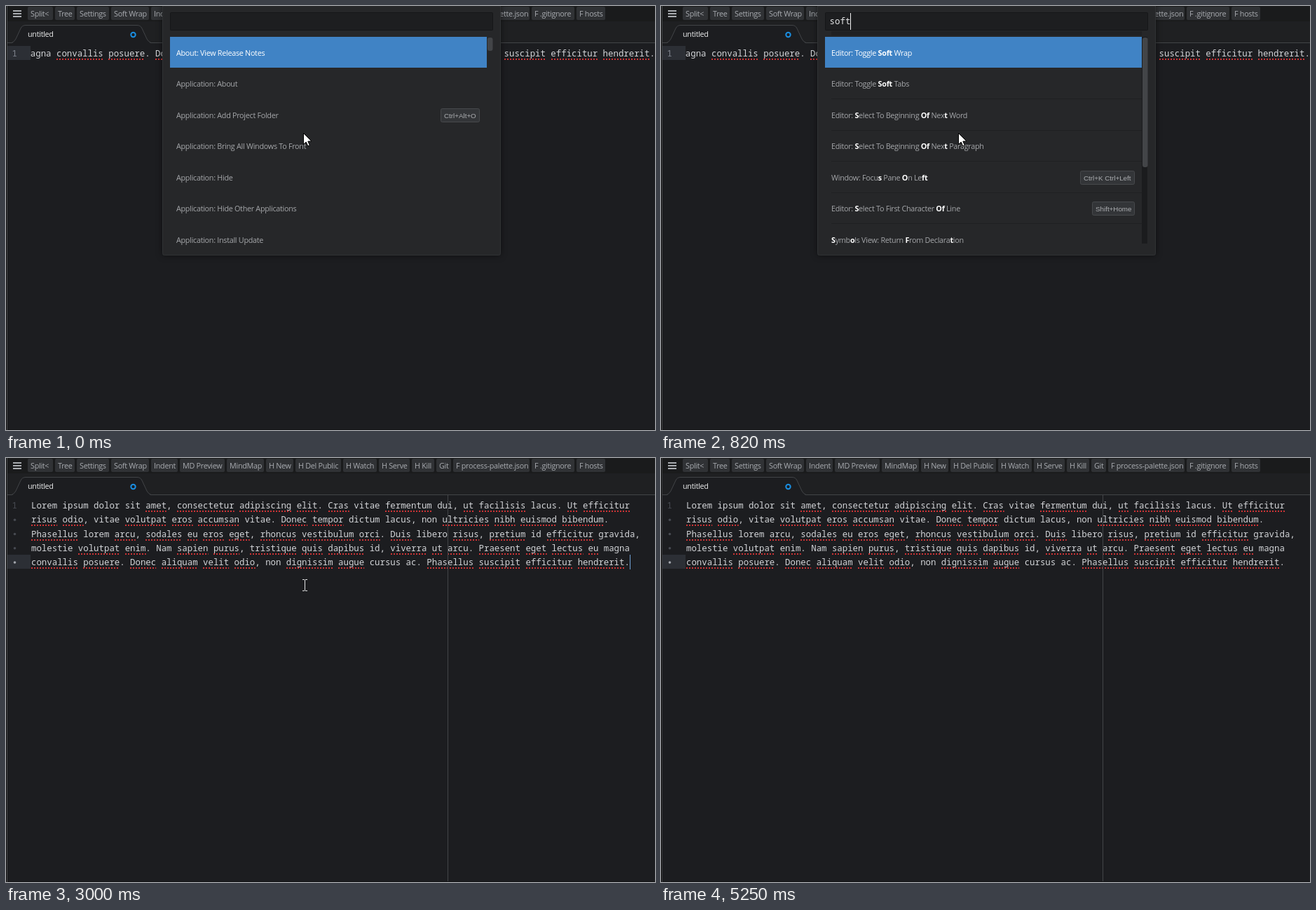
These frames come from a looping animation (926 by 605 pixels, 5320 ms). An HTML page with a canvas:

```html
<!DOCTYPE html>
<html lang="en">
<head>
<meta charset="utf-8">
<title>Soft wrap toggle</title>
<style>
  html, body { margin: 0; width: 100%; height: 100%; overflow: hidden; background: #1c1d20; }
  canvas { display: block; width: 926px; height: 605px; }
</style>
</head>
<body>
<canvas id="stage"></canvas>
<script>
const W = 926, H = 605, LOOP = 5320;
const UI = '10.8px "Open Sans", "Noto Sans", sans-serif';
const UI_BOLD = 'bold ' + UI;
const MONO = '12.38px "Noto Sans Mono", "DejaVu Sans Mono", monospace';
const KEY = '9.8px "Liberation Sans", Arial, sans-serif';
const CHAR = 7.43, LINE = 20.25, ROW = 44.45;

const canvas = document.getElementById('stage');
const ctx = canvas.getContext('2d');
const dpr = window.devicePixelRatio || 1;
canvas.width = W * dpr;
canvas.height = H * dpr;
ctx.scale(dpr, dpr);

const BUTTONS = [
  ['Split<', 35], ['Tree', 74], ['Settings', 105], ['Soft Wrap', 154], ['Indent', 211],
  ['MD Preview', 252], ['MindMap', 319], ['H New', 375], ['H Del Public', 417],
  ['H Watch', 485], ['H Serve', 536], ['H Kill', 583], ['Git', 618],
  ['F process-palette.json', 642], ['F .gitignore', 754], ['F hosts', 818], ['', 862]
];

const LINES = [
  'Lorem ipsum dolor sit amet, consectetur adipiscing elit. Cras vitae fermentum dui, ut facilisis lacus. Ut efficitur',
  'risus odio, vitae volutpat eros accumsan vitae. Donec tempor dictum lacus, non ultricies nibh euismod bibendum.',
  'Phasellus lorem arcu, sodales eu eros eget, rhoncus vestibulum orci. Duis libero risus, pretium id efficitur gravida,',
  'molestie volutpat enim. Nam sapien purus, tristique quis dapibus id, viverra ut arcu. Praesent eget lectus eu magna',
  'convallis posuere. Donec aliquam velit odio, non dignissim augue cursus ac. Phasellus suscipit efficitur hendrerit.'
];
const KNOWN = new Set(('Lorem lorem ipsum dolor sit vitae dui lacus dictum non libero id gravida ' +
  'molestie Nam magna cursus ac').split(' '));

// Asterisks switch bold on and off; the second entry is the shortcut.
const LISTS = {
  all: [
    ['About: View Release Notes'], ['Application: About'],
    ['Application: Add Project Folder', 'Ctrl+Alt+O'],
    ['Application: Bring All Windows To Front'], ['Application: Hide'],
    ['Application: Hide Other Applications'], ['Application: Install Update']
  ],
  s: [
    ['Core: *S*ave', 'Ctrl+S'], ['*S*tyleguide: Show', 'Ctrl+Shift+G'],
    ['*S*nippets: Expand', 'Tab'], ['Core: *S*ave As', 'Ctrl+Shift+S'],
    ['Pane: *S*plit Up', 'Ctrl+K Up'], ['Welcome: *S*how'], ['*S*tatus Bar: Toggle']
  ],
  soft: [
    ['Editor: Toggle *Soft* Wrap'], ['Editor: Toggle *Soft* Tabs'],
    ['Editor: *S*elect To Beginning *Of* Nex*t* Word'],
    ['Editor: *S*elect To Beginning *Of* Nex*t* Paragraph'],
    ['Window: Focu*s* Pane *O*n Le*ft*', 'Ctrl+K Ctrl+Left'],
    ['Editor: *S*elect To First Character *Of* Line', 'Shift+Home'],
    ['*S*ymb*o*ls View: Return *F*rom Declara*t*ion']
  ]
};

// Value of the last [time, value] step at or before t.
const at = (steps, t) => steps.filter(s => s[0] <= t).pop()[1];

const QUERY = [[0, ''], [400, 's'], [550, 'so'], [670, 'sof'], [820, 'soft']];
const LIST = [[0, 'all'], [550, 's'], [820, 'soft']];
const CARET = [[0, 0], [280, 1], [1340, 0], [1740, 1], [2020, 0], [2450, 1], [2880, 0],
  [3000, 1], [3430, 0], [3840, 1], [4150, 0], [4590, 1], [4970, 0]];
const BEAM = [[0, [426, 181]], [4590, [491, 190]], [4730, [560, 325]], [4850, [640, 452]], [4970, null]];

function rect(x, y, w, h, color) {
  ctx.fillStyle = color;
  ctx.fillRect(x, y, w, h);
}

function box(x, y, w, h, r, fill, line) {
  ctx.beginPath();
  ctx.roundRect(x, y, w, h, r);
  ctx.fillStyle = fill;
  ctx.fill();
  if (line) {
    ctx.strokeStyle = line;
    ctx.lineWidth = 1;
    ctx.stroke();
  }
}

function text(str, x, y, color, font = UI) {
  ctx.font = font;
  ctx.letterSpacing = font === UI || font === UI_BOLD ? '-0.29px' : '0px';
  ctx.fillStyle = color;
  ctx.fillText(str, x, y);
  return ctx.measureText(str).width;
}

function polyline(points, close) {
  ctx.beginPath();
  points.forEach(([x, y]) => ctx.lineTo(x, y));
  if (close) ctx.closePath();
}

function drawToolbar() {
  rect(0, 0, W, 22, '#1a1b1c');
  for (let i = 0; i < 3; i++) rect(10, 6 + 4 * i, 12, 2, '#a9acb0');
  BUTTONS.slice(0, -1).forEach(([label, x], i) => {
    const w = BUTTONS[i + 1][1] - x - 3;
    box(x - 4, 1, w, 19, 2, '#303235');
    text(label, x, 15, '#a8abb0');
  });
}

function drawTabs() {
  rect(0, 22, W, 31, '#1f2022');
  rect(0, 52, W, 1, '#424447');
  ctx.beginPath();
  ctx.moveTo(8, 52.5);
  ctx.quadraticCurveTo(12, 51, 14, 47);
  ctx.lineTo(21, 32);
  ctx.quadraticCurveTo(23, 27.5, 28, 27.5);
  ctx.lineTo(187, 27.5);
  ctx.quadraticCurveTo(192, 27.5, 194, 32);
  ctx.lineTo(201, 47);
  ctx.quadraticCurveTo(203, 51, 207, 52.5);
  ctx.fillStyle = '#1c1d20';
  ctx.fill();
  ctx.strokeStyle = '#424447';
  ctx.lineWidth = 1;
  ctx.stroke();
  rect(10, 52, 195, 1, '#1c1d20');
  text('untitled', 31, 44, '#eceded');
  ctx.beginPath();
  ctx.arc(181.5, 41, 3.2, 0, 7);
  ctx.strokeStyle = '#1a8fe3';
  ctx.lineWidth = 2;
  ctx.stroke();
}

function drawCode(line, x, y) {
  text(line, x, y, '#d3d5d8', MONO);
  ctx.strokeStyle = '#cf3335';
  ctx.lineWidth = 2;
  ctx.setLineDash([2, 2]);
  for (const m of line.matchAll(/\w+/g)) {
    if (KNOWN.has(m[0])) continue;
    const left = Math.round(x + m.index * CHAR), top = Math.round(y) + 4;
    polyline([[left, top], [left + m[0].length * CHAR, top]]);
    ctx.stroke();
  }
  ctx.setLineDash([]);
}

function drawUnwrapped() {
  rect(2, 57, 33, 20, '#2c2f35');
  text('1', 8.5, 72, '#7d828b', MONO);
  ctx.save();
  ctx.beginPath();
  ctx.rect(35, 54, W, 40);
  ctx.clip();
  drawCode('magna ' + LINES[4], 72 - 6 * CHAR, 72);
  ctx.restore();
}

function drawWrapped(caret) {
  rect(2, 138, 33, 20, '#2c2f35');
  LINES.forEach((line, i) => {
    const y = 72 + i * LINE;
    if (i) {
      ctx.beginPath();
      ctx.arc(12.5, y - 4, 1.8, 0, 7);
      ctx.fillStyle = i === 4 ? '#a0a4aa' : '#474a51';
      ctx.fill();
    } else {
      text('1', 8.5, y, '#474a51', MONO);
    }
    drawCode(line, 36, y);
  });
  rect(630, 53, 1, H - 53, '#434548');
  if (caret) rect(890, 138, 1, 21, '#6fa0d4');
}

function drawShortcut(keys, mid, selected) {
  ctx.font = KEY;
  ctx.letterSpacing = '0px';
  const w = Math.round(ctx.measureText(keys).width) + 9;
  const x = 675.5 - w;
  box(x, mid - 9.5, w, 19, 2, selected ? '#45688e' : '#333538', selected ? '#5780ab' : '#47494c');
  text(keys, x + 4.5, mid + 3.5, selected ? '#f2f5f8' : '#abadb0', KEY);
}

function drawPalette(query, name, caret) {
  ctx.save();
  ctx.shadowColor = 'rgba(0,0,0,.5)';
  ctx.shadowBlur = 8;
  box(223, -6, 483, 362, 3, '#262729');
  ctx.restore();
  box(223.5, -6, 482, 361.5, 3, '#262729', '#303234');

  box(234.5, 9.5, 460, 25, 1, '#1d1e20', '#151618');
  text(query, 240.6, 26, '#e6e7e8', MONO);
  if (caret) rect(Math.floor(240.6 + query.length * CHAR), 10, 1, 24, '#f0f0f0');

  const full = name === 'soft';
  if (full) {
    rect(243, 36, 443, 6, '#202123');
    rect(686, 44, 8, 295, '#1b1c1e');
  }
  rect(234, 44, 452, 44, '#4083c5');
  box(687, 45, 7.5, full ? 185 : 19, 3, '#434548');

  LISTS[name].forEach(([label, keys], i) => {
    const mid = 67 + Math.round(i * ROW);
    let x = 243;
    label.split('*').forEach((part, k) => {
      const bold = k % 2;
      x += text(part, x, mid + 4, bold || !i ? '#ffffff' : '#a5a7aa', bold ? UI_BOLD : UI);
    });
    if (keys) drawShortcut(keys, mid, !i);
    if (i && i < 6 && name !== 'all') rect(243, mid + 21, full ? 443 : 433, 1, '#1f2022');
  });
}

function drawArrow(x, y) {
  polyline([[0, 0], [0, 16], [3.7, 12.6], [6.3, 18.3], [8.8, 17.2], [6.3, 11.6], [11.4, 11.4]]
    .map(p => [p[0] + x, p[1] + y]), true);
  ctx.fillStyle = '#ffffff';
  ctx.fill();
  ctx.strokeStyle = '#000000';
  ctx.lineWidth = 1;
  ctx.stroke();
}

function drawBeam([x, y]) {
  rect(x, y - 7, 1, 15, '#e4e5e6');
  for (const edge of [y - 8, y + 8]) {
    rect(x - 3, edge, 3, 1, '#e4e5e6');
    rect(x + 1, edge, 3, 1, '#e4e5e6');
  }
}

function draw(t) {
  const caret = at(CARET, t);
  rect(0, 0, W, H, '#1c1d20');
  drawToolbar();
  drawTabs();
  if (t < 3000) {
    drawUnwrapped();
    drawPalette(at(QUERY, t), at(LIST, t), caret);
    drawArrow(424.5, 181.5);
  } else {
    drawWrapped(caret);
    const beam = at(BEAM, t);
    if (beam) drawBeam(beam);
  }
  rect(0, H - 1, W, 1, '#141416');
  rect(0, 0, 1, H, '#0c0c0d');
  rect(1, 0, 1, H, t < 5250 ? '#48494b' : '#3a3b3d');
}

const start = performance.now();
function tick() {
  draw((performance.now() - start) % LOOP);
  requestAnimationFrame(tick);
}
tick();
</script>
</body>
</html>
```
